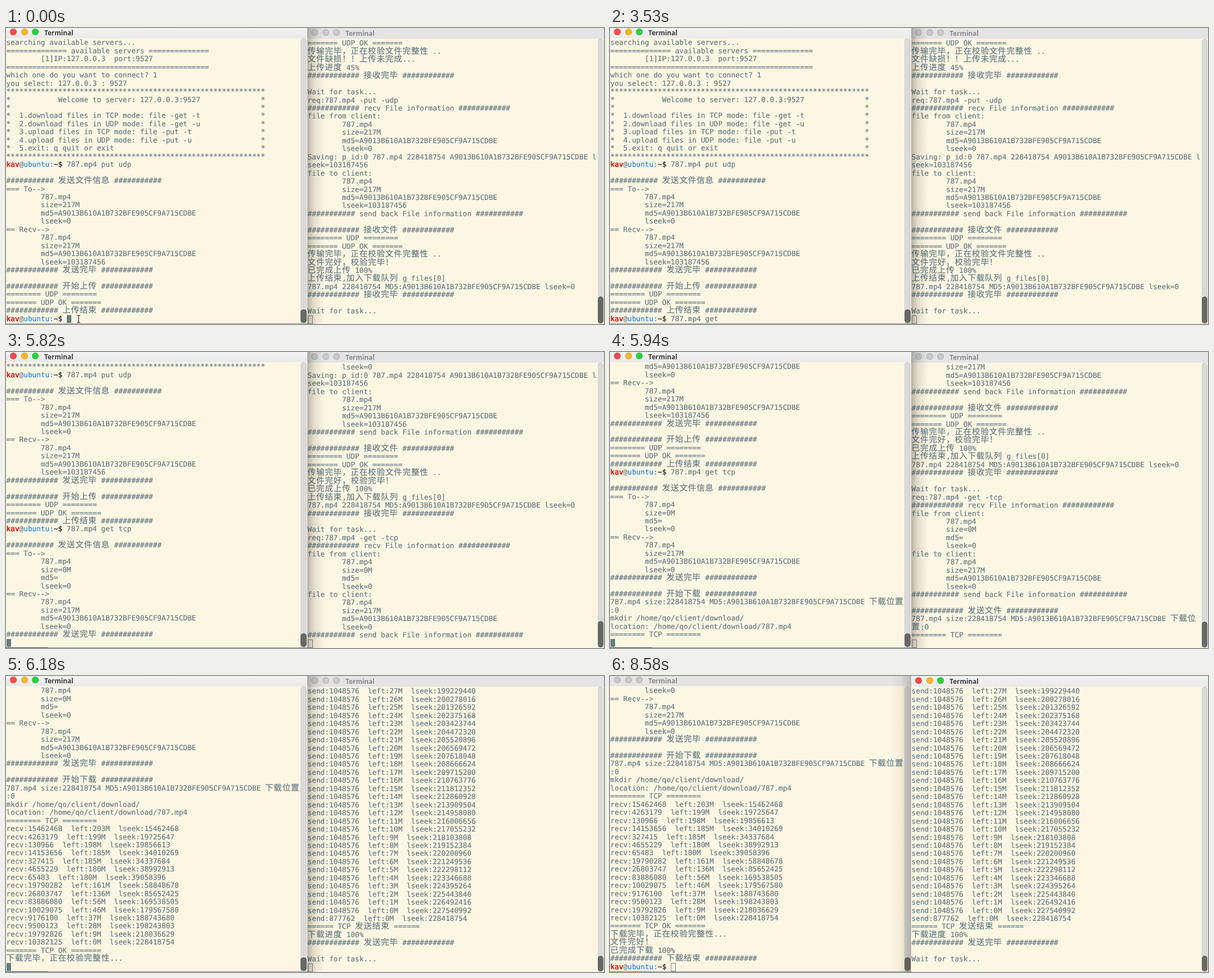
Write an HTML page that moves like this. It is 1062 px wide and 527 px high and loops after 9070 ms.

```html
<!DOCTYPE html>
<html lang="zh-CN">
<head>
<meta charset="utf-8">
<title>Terminal</title>
<style>
html, body { margin: 0; width: 100%; height: 100%; overflow: hidden; background: #fdf6e3; }
#stage { position: relative; width: 1062px; height: 527px; overflow: hidden; }
.win, .bar, .pane, .row, .cur, .track, .thumb, .shade, .dot, .name, .edge { position: absolute; }
.win { top: 0; height: 527px; overflow: hidden; background: #fdf6e3; }
.bar { left: 0; right: 0; top: 0; background: #e4e4e4; }
.on .bar { background: linear-gradient(#f3f3f3, #e9e9e9); }
.dot { width: 12px; height: 12px; border-radius: 50%; background: #c8c8c8; box-shadow: inset 0 0 0 .7px rgba(0, 0, 0, .14); }
.on .dot.r { background: #fb4a4b; }
.on .dot.y { background: #fdb52c; }
.on .dot.g { background: #2bd03c; }
.name { font: bold 11.7px/16px "Open Sans", "Noto Sans", sans-serif; color: #8b8b8b; }
.on .name { color: #3d3d3d; }
.row { white-space: pre; height: 14.45px; color: #657b83; text-rendering: geometricPrecision;
  font: 12.73px/14.45px "DejaVu Sans Mono", monospace; text-spacing-trim: space-all;
  -webkit-text-stroke: .2px; }
.row i { font: 14.6px/0 "Noto Sans CJK JP", "Noto Sans CJK SC", sans-serif; letter-spacing: .73px; }
.row b { color: #cc0000; font-weight: normal; -webkit-text-stroke: .4px; }
.row u { color: #1f83e8; text-decoration: none; }
.row s { color: #111; text-decoration: none; }
.cur { width: 8px; height: 14px; box-sizing: border-box; background: #657b83; }
.cur.hollow { background: none; border: 1px solid #75888e; width: 9px; height: 15px; }
.track { bottom: 1px; background: #dadada; border-radius: 6px 6px 0 0; box-shadow: inset 0 0 0 1px #d0d0d0; }
.thumb { background: #686868; border-radius: 5px; }
.shade { top: 0; height: 527px; pointer-events: none; }
.edge { left: 0; top: 526px; height: 1px; }
#beam { position: absolute; }
</style>
</head>
<body>
<div id="stage"></div>
<script>
const LOOP = 9070, CELL = 7.665, LINE = 14.45, ROWS = 35;
const SIZE = 228418754, MB = 1048576, HASH = 'A9013B610A1B732BFE905CF9A715CDBE';

const frame = (c, n, s) => `${c.repeat(n)} ${s} ${c.repeat(n)}`;
const hash = s => frame('#', 12, s);
const starred = s => '*' + s.padEnd(58) + '*';
const info = (size, md5, seek) =>
  ['787.mp4', `size=${size}M`, `md5=${md5}`, `lseek=${seek}`].map(s => ' '.repeat(8) + s);
const full = seek => info(217, HASH, seek);
const empty = info(0, '', 0);

// Transfer log: each chunk with what is left and the running offset.
function log(verb, chunks) {
  let pos = 0;
  return chunks.map(n => {
    pos += n;
    return `${verb}:${n}  left:${Math.floor((SIZE - pos) / MB)}M  lseek:${pos}`;
  });
}

const PROMPT = '\x01';
const leftLines = [
  'searching available servers...',
  frame('=', 14, 'available servers'),
  '        [1]IP:127.0.0.3  port:9527',
  '='.repeat(47),
  'which one do you want to connect? 1',
  'you select: 127.0.0.3 : 9527',
  '*'.repeat(60),
  starred('           Welcome to server: 127.0.0.3:9527'),
  starred(''),
  starred('  1.download files in TCP mode: file -get -t'),
  starred('  2.download files in UDP mode: file -get -u'),
  starred('  3.upload files in TCP mode: file -put -t'),
  starred('  4.upload files in UDP mode: file -put -u'),
  starred('  5.exit: q quit or exit'),
  '*'.repeat(60),
  PROMPT + '787.mp4 put udp',
  '',
  frame('#', 11, '发送文件信息'),
  '=== To-->', ...full(0),
  '== Recv-->', ...full(103187456),
  hash('发送完毕'),
  '',
  hash('开始上传'),
  frame('=', 8, 'UDP'),
  frame('=', 7, 'UDP OK'),
  hash('上传结束'),
  PROMPT,
  '',
  frame('#', 11, '发送文件信息'),
  '=== To-->', ...empty,
  '== Recv-->', ...full(0),
  hash('发送完毕'),
  '',
  hash('开始下载'),
  `787.mp4 size:${SIZE} MD5:${HASH} 下载位置`,
  ':0',
  'mkdir /home/qo/client/download/',
  'location: /home/qo/client/download/787.mp4',
  frame('=', 8, 'TCP'),
  ...log('recv', [15462468, 4263179, 130966, 14153656, 327415, 4655229, 65483, 19790282,
    26803747, 83886080, 10029075, 9176100, 9500123, 19792826, 10382125]),
  frame('=', 7, 'TCP OK'),
  '下载完毕，正在校验完整性...',
  '文件完好！',
  '已完成下载 100%',
  hash('下载结束'),
  PROMPT
];

const rightLines = [
  frame('=', 7, 'UDP OK'),
  '传输完毕，正在校验文件完整性 ..',
  '文件缺损！！上传未完成...',
  '上传进度 45%',
  hash('接收完毕'),
  '',
  'Wait for task...',
  'req:787.mp4 -put -udp',
  hash('recv File information'),
  'file from client:', ...full(0),
  `Saving: p_id:0 787.mp4 ${SIZE} ${HASH} l`,
  'seek=103187456',
  'file to client:', ...full(103187456),
  frame('#', 11, 'send back File information'),
  '',
  hash('接收文件'),
  frame('=', 8, 'UDP'),
  frame('=', 7, 'UDP OK'),
  '传输完毕，正在校验文件完整性 ..',
  '文件完好，校验完毕！',
  '已完成上传 100%',
  '上传结束,加入下载队列 g_files[0]',
  `787.mp4 ${SIZE} MD5:${HASH} lseek=0`,
  hash('接收完毕'),
  '',
  'Wait for task...',
  'req:787.mp4 -get -tcp',
  hash('recv File information'),
  'file from client:', ...empty,
  'file to client:', ...full(0),
  frame('#', 11, 'send back File information'),
  '',
  hash('发送文件'),
  `787.mp4 size:${SIZE} MD5:${HASH} 下载位`,
  '置:0',
  frame('=', 8, 'TCP'),
  ...log('send', [...Array(217).fill(MB), SIZE - 217 * MB]),
  frame('=', 6, 'TCP 发送结束'),
  '下载进度 100%',
  hash('发送完毕'),
  '',
  'Wait for task...'
];

// Step tables: time, value(s)
const TYPED = '787.mp4 get tcp';
const typing = [[0, 0], [120, 1], [240, 2], [830, 8], [2310, 9], [2430, 10], [2550, 11],
  [2920, 12], [3780, 13], [3890, 14], [4760, 15]];
const blink = [[0, 1], [1450, 0], [2070, 1], [3530, 0], [3780, 1], [4510, 0], [4760, 1],
  [5370, 0], [5710, 1], [6280, 0], [6890, 1], [7510, 0], [8000, 1], [8580, 0]];
const output = [[0, 34, 34], [5710, 43, 41], [5820, 48, 47], [5940, 55, 52],
  [6070, 63, 160], [6180, 72, 275], [7020, 75, 275]];
const beamAt = [[0, 128.5, 518], [120, -20, 0], [7760, 760, 520], [7880, 820, 518],
  [8220, 880, 518], [8340, 953, 520], [8460, -20, 0]];
const FOCUS = 8000;

const at = (table, t) => table.filter(r => r[0] <= t).pop();
const stage = document.getElementById('stage');

function add(parent, cls, css = {}) {
  const el = document.createElement('div');
  el.className = cls;
  Object.assign(el.style, css);
  parent.append(el);
  return el;
}
const px = n => n + 'px';

function makeWindow(x, w, top, trackX, trackW) {
  const win = add(stage, 'win', { left: px(x), width: px(w) });
  const barH = Math.floor(top) - 1 + 'px';
  add(win, 'bar', { height: barH });
  ['r', 'y', 'g'].forEach((c, i) =>
    add(win, 'dot ' + c, { left: px(7 + i * 19.5), top: px(top - 18.8) }));
  add(win, 'name', { left: '68px', top: px(top - 20.3) }).textContent = 'Terminal';
  add(win, 'track', { left: px(trackX), width: px(trackW), top: barH });
  const thumb = add(win, 'thumb', { left: px(trackX), width: px(trackW) });
  const rows = Array.from({ length: ROWS }, (_, i) =>
    add(win, 'row', { left: '.6px', top: px(top + .6 + i * LINE) }));
  const cur = add(win, 'cur');
  return { win, thumb, rows, cur, top, last: '' };
}

const left = makeWindow(0, 535, 19.8, 523, 11);
const right = makeWindow(535, 527, 20.8, 516, 10);
add(left.win, 'edge', { width: '535px', background: '#8d9190' });
const edge = add(left.win, 'edge', { width: '75px' });
const leftShade = add(stage, 'shade', { left: '499px', width: '36px',
  background: 'linear-gradient(90deg, rgba(60,55,40,0), rgba(60,55,40,.06) 50%, rgba(60,55,40,.25))' });
const rightShade = add(stage, 'shade', { left: '535px', width: '30px',
  background: 'linear-gradient(90deg, rgba(50,48,40,.34), rgba(50,48,40,.12) 40%, rgba(50,48,40,0))' });
left.thumb.style.top = '501px';
left.thumb.style.height = '24px';

const BEAM = 'M-3-6.5Q0-6.5 0-5Q0-6.5 3-6.5M0-5V5M-3 6.5Q0 6.5 0 5Q0 6.5 3 6.5';
stage.insertAdjacentHTML('beforeend', `<svg id="beam" width="10" height="16" viewBox="-5 -8 10 16" fill="none">
  <path d="${BEAM}" stroke="#fff" stroke-width="2.6"/><path d="${BEAM}" stroke="#222" stroke-width="1.2"/></svg>`);
const beam = document.getElementById('beam');

const markup = s => s
  .replace(/>/g, '&gt;')
  .replace(/[\u3000-\u9fff\uff00-\uffef]+/g, '<i>$&</i>')
  .replace(PROMPT, '<b>kav</b>@<u>ubuntu:</u><s>~$</s> ');

function showPane(pane, lines, end, input, col, focused, lit) {
  const key = end + input;
  if (pane.last !== key) {
    pane.last = key;
    pane.rows.forEach((row, i) => {
      const n = end - ROWS + 1 + i;
      const own = lines === leftLines && n === 34 ? input : '';
      const text = n < end || lines[n] === PROMPT ? lines[n] || '' : '';
      row.innerHTML = markup(text + own);
    });
  }
  pane.win.classList.toggle('on', focused);
  pane.cur.classList.toggle('hollow', !focused);
  pane.cur.style.visibility = !focused || lit ? 'visible' : 'hidden';
  pane.cur.style.left = px(.6 + col * CELL);
  pane.cur.style.top = px(Math.round(pane.top + (ROWS - 1) * LINE));
}

function draw(now) {
  const t = now % LOOP;
  const [, l, r] = at(output, t);
  const input = TYPED.slice(0, at(typing, t)[1]);
  const lit = at(blink, t)[1], onLeft = t < FOCUS;
  const col = l === 34 ? 14 + input.length : l === 75 ? 14 : 0;
  showPane(left, leftLines, l, input, col, onLeft, lit);
  showPane(right, rightLines, r, '', 0, !onLeft, lit);

  const y = 478 + (r - 34) * .084;
  right.thumb.style.top = px(y);
  right.thumb.style.height = px(526 - y);
  leftShade.style.visibility = onLeft ? 'hidden' : 'visible';
  rightShade.style.visibility = onLeft ? 'visible' : 'hidden';
  edge.style.background = l === 34 ? '#8d9190' : onLeft ? '#2b3f5c' : '#3a78b8';

  const [, bx, by] = at(beamAt, t);
  beam.style.left = px(bx - 5);
  beam.style.top = px(by - 8);
}

const start = performance.now();
function tick() {
  draw(performance.now() - start);
  requestAnimationFrame(tick);
}
tick();
</script>
</body>
</html>
```
